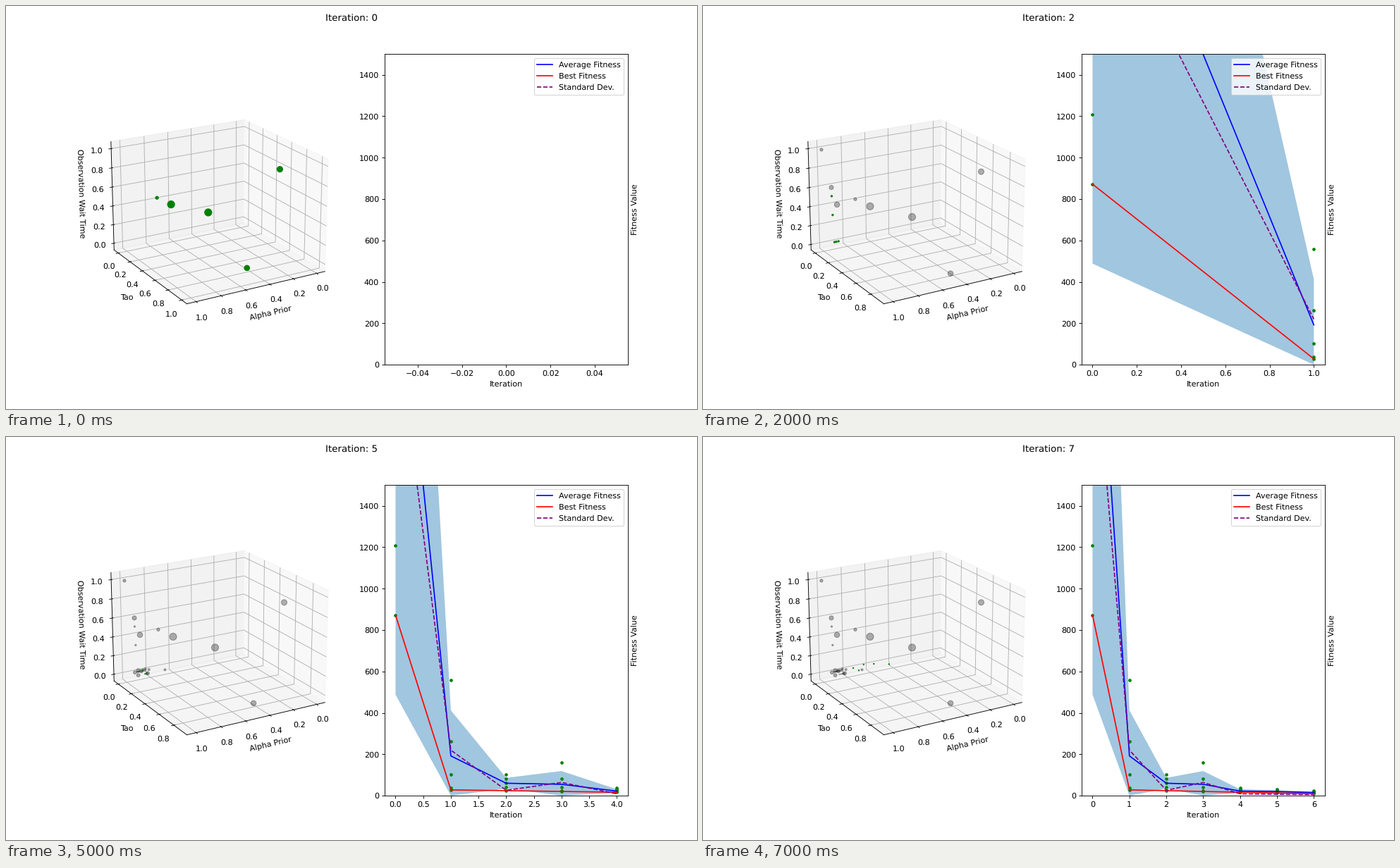
Animation of 980 by 572 pixels, one loop 8 s. Source, as a matplotlib script:

```python
import numpy as np
import matplotlib.pyplot as plt
from matplotlib.animation import FuncAnimation

DPI = 80
STEPS = 8
RANK = np.linspace(0, 1, 5)

# Scouting rounds: alpha prior, tao, wait time, marker area
SCOUTS = [
    [(0, .559, .791, 52), (.841, .2, .544, 14), (.777, .3, .501, 82),
     (.807, .905, .683, 82), (.465, .865, .013, 45)],
    [(1, 0, 1, 14), (.926, 0, .596, 29), (.882, 0, .407, 45)],
]
# Later rounds trail along the floor: first alpha, last alpha, easing, area
TRAILS = [(.925, .876, 1.7, 4), (.931, .8425, 1.7, 18), (.849, .695, 5, 7),
          (.8665, .861, 1, .7), (.891, .876, 1, .9), (.75, .4585, 1.7, 1.2)]

AVERAGE = np.array([2805, 192, 60, 55, 22, 20, 15])
SPREAD = np.array([2317, 220, 26, 64, 9, 6.5, 5.3])
BEST = np.append(872, np.linspace(28, 9, 6))


def trail(n):
    """Particles of one later round; the first one still sinks."""
    first, last, ease, area = TRAILS[n]
    k = np.arange(5)
    sway = np.sin(2 * np.pi * k / 3) * (n > 0)
    height = .49 * (n == 0) * (1 - np.minimum(k / 2, 1) ** 1.3)
    x = first + (last - first) * RANK ** ease
    y = .04 * np.maximum(sway, 0)
    z = height + .0155 * (1 - sway / np.sin(2 * np.pi / 3))
    return np.column_stack([x, y, z, np.full(5, area)])


def fitness(n):
    """Five values from best to worst, more skewed for a wide spread."""
    worst = AVERAGE[n] + 1.66 * SPREAD[n]
    skew = 2.48 * SPREAD[n] / AVERAGE[n]
    return BEST[n] + (worst - BEST[n]) * RANK ** skew


SWARM = [np.array(s) for s in SCOUTS] + [trail(n) for n in range(len(TRAILS))]
FITNESS = np.array([fitness(n) for n in range(len(BEST))])

plt.rcParams["text.hinting"] = "none"
fig = plt.figure(figsize=(980 / DPI, 572 / DPI), dpi=DPI)
fig.subplots_adjust(top=.8805)
space = fig.add_subplot(1, 2, 1, projection="3d", computed_zorder=False)
chart = fig.add_subplot(1, 2, 2)


def scatter_swarm(points, **style):
    x, y, z, area = points.T
    space.scatter(x, y, z, s=area, depthshade=False, **style)


def draw_space(i):
    space.clear()
    space.view_init(elev=20, azim=60)
    low, high = np.zeros(3), np.ones(3)
    if i:
        past = np.vstack(SWARM[:i])
        scatter_swarm(past, color="black", alpha=.3, zorder=1)
        seen = np.vstack(SWARM[:i + 1])[:, :3]
        low, high = seen.min(axis=0), seen.max(axis=0)
    scatter_swarm(SWARM[i], color="green", zorder=2)
    pad = .0729 * (high - low)
    limits = zip(low - pad, high + pad)
    for set_lim in (space.set_xlim, space.set_ylim, space.set_zlim):
        set_lim(*next(limits))
    space.set_xlabel("Alpha Prior")
    space.set_ylabel("Tao")
    space.set_zlabel("Observation Wait Time")


def draw_chart(i):
    chart.clear()
    t = np.arange(i)
    avg, best, dev = AVERAGE[:i], BEST[:i], SPREAD[:i]
    chart.plot(t, avg, color="blue", label="Average Fitness")
    chart.plot(t, best, color="red", label="Best Fitness")
    chart.plot(t, dev, "--", color="purple", label="Standard Dev.")
    if i > 1:
        chart.fill_between(t, np.maximum(avg - dev, 0), avg + dev,
                           color="C0", alpha=.42, linewidth=0)
    if i:
        chart.scatter(np.repeat(t, 5), FITNESS[:i].ravel(), s=10,
                      color="green")
    last = max(i - 1, 0)
    pad = .05 * last or .055
    chart.set_xlim(-pad, last + pad)
    chart.set_ylim(0, 1500)
    chart.set_xlabel("Iteration")
    chart.set_ylabel("Fitness Value")
    chart.yaxis.set_label_position("right")
    chart.legend(loc="upper right")


def draw(i):
    fig.suptitle(f"Iteration: {i}")
    draw_space(i)
    draw_chart(i)
    return []


anim = FuncAnimation(fig, draw, frames=STEPS, init_func=lambda: draw(0),
                     interval=1000, repeat=True, repeat_delay=0)
plt.show()
```
